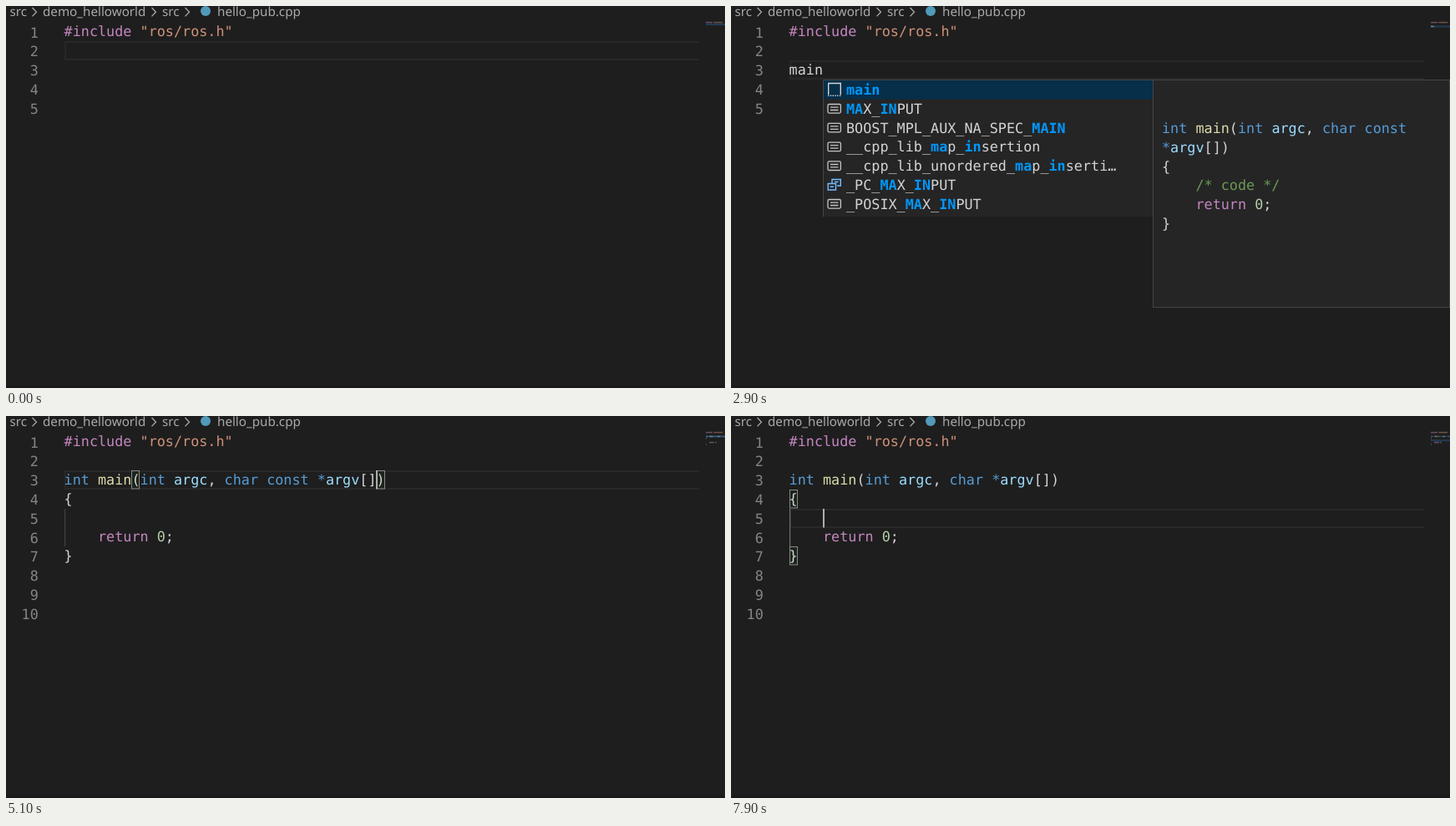
These frames come from a looping animation (861x457 px, 8 s). An HTML page:

```html
<!DOCTYPE html>
<html lang="en">
<head>
<meta charset="utf-8">
<title>Editor</title>
<style>
html, body { margin: 0; width: 100%; height: 100%; overflow: hidden; background: #1e1e1e; }
svg { display: block; width: 861px; height: 457px; }
text { font: 16.8px "DejaVu Sans Mono", monospace; white-space: pre; text-rendering: geometricPrecision; }
.crumb { font: 15.2px "Noto Sans", sans-serif; fill: #a9a9a9; }
.hit { font-weight: bold; fill: #0097fb; }
</style>
</head>
<body>
<svg viewBox="0 0 861 457">
  <rect width="861" height="457" fill="#1e1e1e"/>
  <g id="view"></g>
  <g id="crumbs"></g>
  <rect y="454" width="861" height="3" fill="#1a1a1a"/>
</svg>
<script>
const LOOP = 8000, LEFT = 70, TOP = 19.6, ROW = 22.8, CH = 10.114;
const FULL = 'int main(int argc, char const *argv[])';
const PLAIN = '#d4d4d4';
const INCLUDE = '#include "ros/ros.h"';

const RULES = [
  [/^(#include|return)/, '#c586c0'],
  [/^"[^"]*"/, '#ce9178'],
  [/^\/\*.*\*\//, '#6a9955'],
  [/^(int|char|const?|con|co|c)\b|^\*(?=argv)/, '#569cd6'],
  [/^main(?=\()/, '#dcdcaa'],
  [/^arg[cv]/, '#9cdcfe'],
  [/^\d+/, '#b5cea8'],
  [/^(\s+|\w+|.)/, PLAIN]
];

// Brackets are given as [line, column] pairs.
const BRACES = [[4, 0], [7, 0]];
const parens = s => [[3, 8], [3, s.indexOf(')')]];

const steps = [
  { t: 0, line: 2, col: 0, on: false, sig: '', body: null, marks: [] },
  { t: 200, on: true }, { t: 700, on: false }, { t: 1100, on: true },
  { t: 1400, line: 3 }, { t: 1900, on: false },
  ...[1, 2, 3, 4].map(n => ({ t: 2000 + n * 100, on: true, sig: 'main'.slice(0, n), col: n })),
  { t: 2600, list: true }, { t: 2700, docs: true }, { t: 2900, on: false },
  { t: 3100, on: true, list: false, docs: false, sig: FULL, body: '    /* code */', line: 5, col: 14, select: true, stop: true },
  { t: 3500, select: false, body: '    ', col: 4 },
  { t: 3600, marks: BRACES },
  { t: 3900, col: 3, stop: false }, { t: 4100, col: 2 }, { t: 4200, col: 1 },
  { t: 4700, line: 4 }, { t: 4800, line: 3, marks: [] },
  { t: 4900, col: 38, marks: parens(FULL) },
  { t: 5100, col: 37 }, { t: 5200, col: 36, marks: [[3, 35], [3, 36]] },
  { t: 5300, col: 35 }, { t: 5400, marks: parens(FULL) },
  { t: 5600, col: 33 }, { t: 5700, col: 31 }, { t: 5800, col: 29 },
  ...[1, 2, 3, 4, 5].map(n => erase(6100 + n * 100, n)),
  erase(7000, 6),
  { t: 7300, line: 4, col: 1, marks: BRACES }, { t: 7400, line: 5 },
  { t: 7800, col: 4 }
];

function erase(t, n) {
  const sig = FULL.slice(0, 29 - n) + FULL.slice(29);
  return { t, sig, col: 29 - n, marks: parens(sig) };
}

const esc = s => s.replace(/&/g, '&amp;').replace(/</g, '&lt;');
const top_ = n => TOP + ROW * (n - 1);
const colX = c => LEFT + CH * c;
const rect = (x, y, w, h, fill, extra = '') =>
  `<rect x="${x}" y="${y}" width="${w}" height="${h}" fill="${fill}" ${extra}/>`;
const stroke = (d, color, w = 1, extra = '') =>
  `<path d="${d}" fill="none" stroke="${color}" stroke-width="${w}" ${extra}/>`;

function tokens(s) {
  const out = [];
  while (s) {
    for (const [re, color] of RULES) {
      const m = s.match(re);
      if (!m) continue;
      out.push([m[0], color]);
      s = s.slice(m[0].length);
      break;
    }
  }
  return out;
}

const code = (s, x, y) => `<text x="${x}" y="${y}">` +
  tokens(s).map(([w, c]) => `<tspan fill="${c}">${esc(w)}</tspan>`).join('') + '</text>';

function currentLine(n) {
  const a = Math.round(top_(n)) + 1, b = Math.round(top_(n + 1)) - 1;
  return stroke(`M830 ${a}H71V${b}H830`, '#282828', 2);
}

function minimap(lines, s) {
  let out = rect(838, 18.6 + 2.4 * (s.line - 1), 23, 2.2, '#264f78', 'opacity=".6"');
  lines.forEach((str, i) => {
    let x = 838;
    for (const [w, c] of tokens(str)) {
      for (const part of w.split(/(\s+)/)) {
        if (part.trim()) out += rect(x, 18.9 + 2.4 * i, part.length * 1.03 - .3, 1.5, c, 'opacity=".45"');
        x += part.length * 1.03;
      }
    }
  });
  return out;
}

// Matched letters sit between square brackets.
const ITEMS = ['[main]', '[MA]X_[IN]PUT', 'BOOST_MPL_AUX_NA_SPEC_[MAIN]', '__cpp_lib_[ma]p_[in]sertion',
  '__cpp_lib_unordered_[ma]p_[in]serti…', '_PC_[MA]X_[IN]PUT', '_POSIX_[MA]X_[IN]PUT'];

function icon(i, y) {
  if (i === 0) return stroke(`M116.7 ${y + 6}V${y - 7.5}H131.3V${y + 6}`, '#d4d4d4', 1.4) +
    stroke(`M116 ${y + 7.3}H132`, '#d4d4d4', 1.4, 'stroke-dasharray="1.4 1.4"');
  if (i === 5) return stroke(`M121 ${y - 2}V${y - 6.5}H131.3V${y + 1}H127M116.2 ${y - 1.5}H125.5V${y + 6}H116.2ZM118.5 ${y + 2.2}H123M124 ${y - 3.5}H128.5`, '#75beff', 1.4);
  return rect(116, y - 5.3, 15.4, 10.6, 'none', 'rx="1.5" stroke="#c5c5c5" stroke-width="1.3"') +
    stroke(`M119 ${y - 1.7}H128.5M119 ${y + 1.7}H128.5`, '#c5c5c5', 1.3);
}

function suggestions() {
  let out = rect(110, 88, 396, 164, '#252526') + rect(111, 89, 394, 22.5, '#062f4a');
  ITEMS.forEach((item, i) => {
    const y = 100 + ROW * i;
    const label = esc(item).replace(/\[(.*?)\]/g, '<tspan class="hit">$1</tspan>');
    out += icon(i, y) + `<text x="138" y="${y + 6}" fill="${PLAIN}">${label}</text>`;
  });
  return out + stroke('M110.5 252V88.5H505.5V252', '#454545');
}

function docs() {
  const body = ['int main(int argc, char const', '*argv[])', '{', '    /* code */', '    return 0;', '}'];
  return rect(505.5, 88.5, 355, 272, '#252526', 'stroke="#454545"') +
    body.map((s, i) => code(s, 516, 152 + ROW * i)).join('');
}

function draw(s) {
  const open = s.body !== null;
  const lines = [INCLUDE, '', s.sig, ...(open ? ['{', s.body, '    return 0;', '}'] : [])];
  let out = '';
  if (!s.select) out += currentLine(s.line);
  if (open) {
    const active = !s.select && s.line === 5;
    out += rect(70, 111, 1.2, 45, active ? '#707070' : '#404040');
  }
  if (s.stop) out += rect(70, 179, 1.2, 24, '#505050');
  if (s.select) {
    out += rect(colX(4), 111, CH * 10, 22.4, '#3f5d7a');
    for (const c of [6, 11]) out += `<circle cx="${colX(c + .5)}" cy="122" r="1.2" fill="#657f93"/>`;
  }
  for (const [n, c] of s.marks)
    out += rect(Math.floor(colX(c)) + .5, Math.round(top_(n)) + .5, 9, 21.5, 'rgba(0,100,0,.1)', 'stroke="#888"');
  lines.forEach((str, i) => { out += code(str, LEFT - .4, top_(i + 1) + 16.5); });
  for (let n = 1; n <= (open ? 10 : 5); n++)
    out += `<text x="38.8" y="${top_(n) + 18}" text-anchor="end" fill="#858585">${n}</text>`;
  if (s.on) out += rect(Math.round(69.6 + 10.1 * s.col), Math.round(top_(s.line)), 2, 22.5, '#aeafad');
  out += minimap(lines, s);
  if (s.list) out += suggestions();
  if (s.docs) out += docs();
  return out;
}

const crumb = (s, x) => `<text class="crumb" x="${x}" y="12">${s}</text>`;
document.getElementById('crumbs').innerHTML =
  crumb('src', 4.5) + crumb('demo_helloworld', 44) + crumb('src', 187) + crumb('hello_pub.cpp', 253) +
  [31.5, 174.5, 214.5].map(x => stroke(`M${x} 2l5 5.2l-5 5.2`, '#a9a9a9', 1.3)).join('') +
  '<circle cx="239" cy="6" r="6" fill="#519aba"/>';

const view = document.getElementById('view');
const start = performance.now();
let shown = -1;

function tick() {
  const t = (performance.now() - start) % LOOP;
  const count = steps.filter(s => s.t <= t).length;
  if (count !== shown) {
    shown = count;
    view.innerHTML = draw(Object.assign({}, ...steps.slice(0, count)));
  }
  requestAnimationFrame(tick);
}
tick();
</script>
</body>
</html>
```
